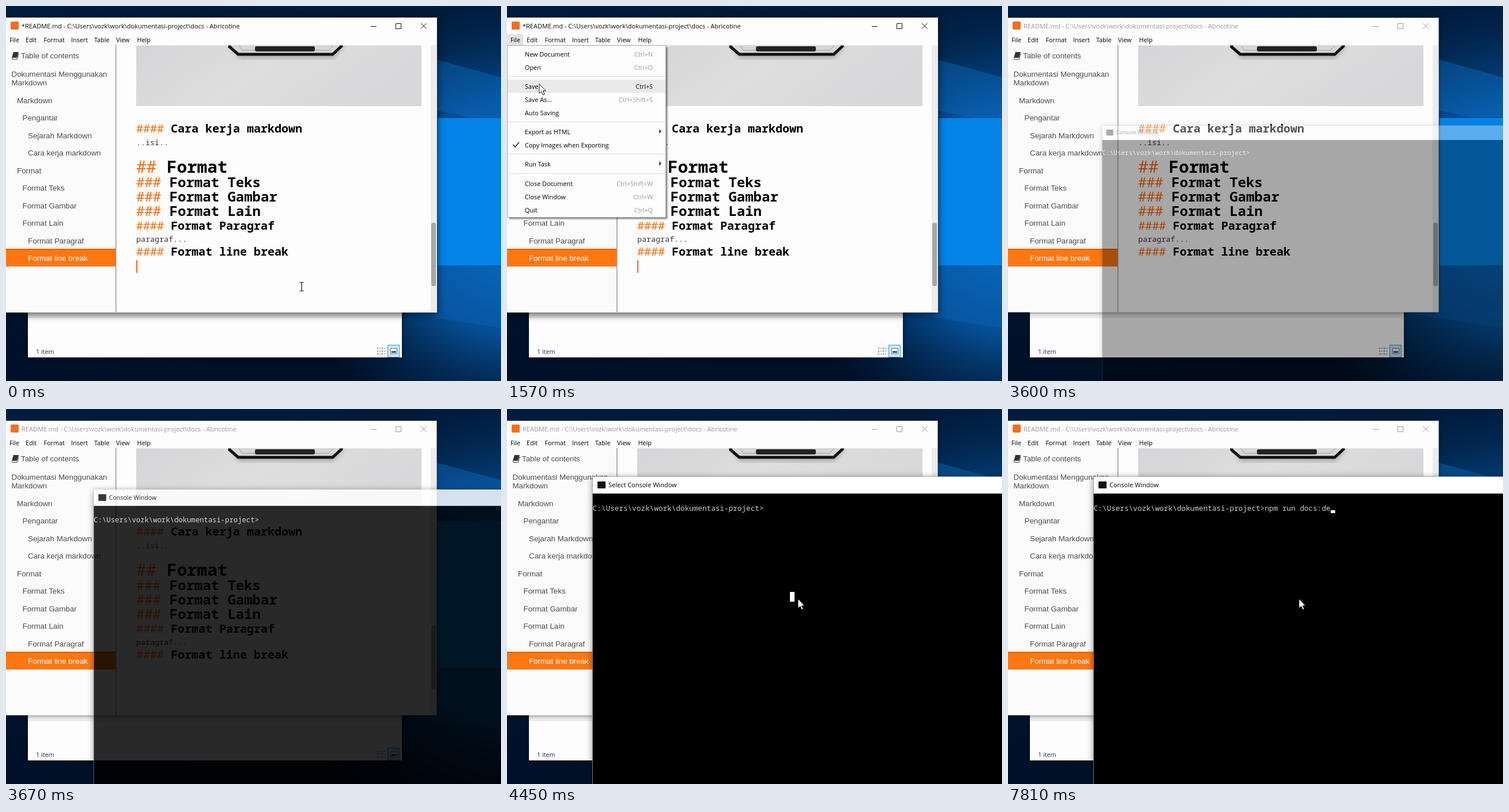
Animation, 859 px wide and 652 px high, one loop 8 s. Source, as an HTML page:

```html
<!DOCTYPE html>
<html lang="id">
<head>
<meta charset="utf-8">
<title>Docs editor</title>
<style>
html, body { margin: 0; width: 100%; height: 100%; overflow: hidden; background: #001a38; }
svg { display: block; }
text { white-space: pre; }
.ui { font: 11px "Open Sans", "Noto Sans", sans-serif; }
.menu { font-size: 10.8px; }
.side { font: 13.33px "Liberation Sans", Arial, sans-serif; fill: #4c4c4c; }
.mono { font-family: "Noto Sans Mono", "DejaVu Sans Mono", monospace; }
.hash { fill: #ff6a0d; font-weight: 400; }
#console { transform-origin: 257px 780px; }
</style>
</head>
<body>
<svg id="stage" width="859" height="652" viewBox="0 0 859 652"></svg>
<script>
const LOOP = 8000;
const PROMPT = 'C:\\Users\\vozk\\work\\dokumentasi-project>';
const COMMAND = 'npm run docs:de';
const COL = 7.62, COMMAND_X = 148.6 + PROMPT.length * COL;
const FILE_TITLE = 'README.md - C:\\Users\\vozk\\work\\dokumentasi-project\\docs - Abricotine';

const text = (x, y, s, cls = 'ui', attr = '') => `<text x="${x}" y="${y}" class="${cls}" ${attr}>${s}</text>`;
const rect = (x, y, w, h, fill, attr = '') => `<rect x="${x}" y="${y}" width="${w}" height="${h}" fill="${fill}" ${attr}/>`;
const path = (d, attr) => `<path d="${d}" ${attr}/>`;

// Table of contents: [indent level, label]
const toc = [
  [1, 'Markdown'], [2, 'Pengantar'], [3, 'Sejarah Markdown'], [3, 'Cara kerja markdown'],
  [1, 'Format'], [2, 'Format Teks'], [2, 'Format Gambar'], [2, 'Format Lain'],
  [3, 'Format Paragraf'], [3, 'Format line break']
];

// Headings: [level, baseline, size, label]
const headings = [
  [4, 220, 20, 'Cara kerja markdown'], [2, 290, 29.33, 'Format'],
  [3, 315, 24, 'Format Teks'], [3, 340, 24, 'Format Gambar'], [3, 364.5, 24, 'Format Lain'],
  [4, 388.5, 20, 'Format Paragraf'], [4, 434, 20, 'Format line break']
];

// File menu: [centre y, label, shortcut]
const fileMenu = [
  [84, 'New Document', 'Ctrl+N'], [107, 'Open', 'Ctrl+O'],
  [140, 'Save', 'Ctrl+S'], [163, 'Save As...', 'Ctrl+Shift+S'], [186, 'Auto Saving', ''],
  [219, 'Export as HTML', '▸'], [242, 'Copy Images when Exporting', ''], [275, 'Run Task', '▸'],
  [308.5, 'Close Document', 'Ctrl+Shift+W'], [331.5, 'Close Window', 'Ctrl+W'], [354.5, 'Quit', 'Ctrl+Q']
];

const defs = `<defs>
  <linearGradient id="sky" x2="0.3" y2="1">
    <stop stop-color="#001d40"/><stop offset="1" stop-color="#001026"/></linearGradient>
  <radialGradient id="glow" gradientUnits="userSpaceOnUse" cx="880" cy="370" r="400">
    <stop stop-color="#0a6cc4"/><stop offset=".5" stop-color="#0655a2" stop-opacity=".9"/>
    <stop offset="1" stop-color="#02305f" stop-opacity="0"/></radialGradient>
  <linearGradient id="wall" x2="1" y2="0.3">
    <stop stop-color="#d5d5d7"/><stop offset=".5" stop-color="#dededf"/><stop offset="1" stop-color="#d8d8da"/></linearGradient>
  <filter id="soft"><feGaussianBlur stdDeviation="4"/></filter>
  <filter id="tight"><feGaussianBlur stdDeviation="1.5"/></filter>
  <clipPath id="photo"><rect x="226" y="68.500" width="495" height="105.500"/></clipPath>
</defs>`;

const desktop = rect(0, 0, 859, 652, 'url(#sky)') + rect(0, 0, 859, 652, 'url(#glow)') +
  path('M700 80L859 124V205L740 180Z', 'fill="#0d6fc6" opacity=".4"') +
  path('M740 440L859 455V560L687 533Z', 'fill="#0d6fc6" opacity=".25"') +
  rect(749, 195, 256, 256, '#0583e6');

const folder = `<g style="filter:drop-shadow(0 1px 4px #0008)">${rect(38, 300, 649, 311, '#fdfdfd')}</g>` +
  rect(38, 533, 649, 10, '#ececec') + text(52, 604.5, '1 item', 'ui menu', 'fill="#1b2c66"') +
  [594, 599, 604].map(y => [644, 652].map(x =>
    rect(x, y, 2, 2, '#888') + rect(x + 3, y + 0.5, 4, 1, '#999')).join('')).join('') +
  rect(662.5, 589.5, 20, 21, '#c5e7fb', 'stroke="#3aa0d8"') +
  rect(667.5, 595.5, 11, 9, '#fff', 'stroke="#777"') + rect(669, 600, 8, 3, '#456');

const photo = `<g clip-path="url(#photo)">${rect(226, 68, 495, 106, 'url(#wall)')}` +
  path('M390 68L404 91H568L588 68Z', 'fill="#888" opacity=".6" filter="url(#soft)"') +
  path('M388 66V71L403 84H567L582 70V66', 'fill="#d6d6d8" stroke="#111" stroke-width="5"') +
  path('M404 68L410 77H560L568 68', 'fill="none" stroke="#999"') +
  rect(432, 70, 104, 9, '#222', 'rx="3"') + '</g>';

const sidebar = rect(0, 68, 190, 464, '#fbfbfb') + rect(190, 68, 1.5, 464, '#999') +
  path('M13 80H22L19 90H10Z', 'fill="#333"') + path('M10 90.500L11 92.500H19.500L22 83', 'fill="none" stroke="#333"') +
  text(26, 90.5, 'Table of contents', 'side') +
  text(9.5, 123, 'Dokumentasi Menggunakan', 'side') + text(9.5, 138, 'Markdown', 'side') +
  rect(0, 422, 190, 31, '#ff7711') + rect(0, 422, 190, 2, '#d9650d') +
  toc.map(([level, label], i) => text(9.5 + level * 9.5, 168.5 + i * 30.5, label, 'side',
    i == toc.length - 1 ? 'style="fill:#fff"' : '')).join('');

const editor = photo +
  headings.map(([n, y, size, label]) => text(226, y, `<tspan class="hash">${'#'.repeat(n)}</tspan> ${label}`,
    'mono', `font-size="${size}" font-weight="700"`)).join('') +
  [[241.5, '..isi..'], [410, 'paragraf...']].map(([y, s]) =>
    text(226, y, s, 'mono', 'font-size="13.33" fill="#333"')).join('') +
  rect(226, 442, 2, 22, '#f2622a', 'id="caret"') +
  rect(737, 68, 10, 464, '#ececec') + rect(738, 377, 8, 110, '#a8a8a8', 'rx="3"');

const appWindow = `<g id="frame">${rect(-19.5, 20.5, 767, 512, '#fdfdfd')}</g>` +
  rect(8, 27, 14, 14, '#f36f21', 'rx="2"') +
  `<g id="bar">${text(27, 38.5, '', 'ui', 'id="title"')}` +
  path('M633 35.500H643M676.500 30.500H685.500V39.500H676.500ZM720 30L729.500 39.500M729.500 30L720 39.500',
    'fill="none" stroke="currentColor"') + '</g>' +
  rect(0, 49, 28, 19, '#e3e3e3', 'id="hover"') +
  [[6, 'File'], [34, 'Edit'], [65.5, 'Format'], [113, 'Insert'], [153, 'Table'], [191, 'View'], [227.5, 'Help']]
    .map(([x, s]) => text(x, 62.5, s, 'ui menu')).join('') + sidebar + editor;

const menu = `<g id="menu">${rect(4, 72, 274, 298, '#0008', 'filter="url(#tight)"')}` +
  rect(0.5, 68.5, 275, 299, '#fdfdfd', 'stroke="#a5a5a5"') + rect(1, 0, 274, 23, '#e9e9e9', 'id="row"') +
  [122, 201, 257, 291].map(y => rect(1, y, 274, 1, '#dedede')).join('') +
  fileMenu.map(([y, label, key]) => text(31, y + 4, label, 'ui menu') + (key == '▸'
    ? path(`M264 ${y - 5}L268 ${y - 1}L264 ${y + 3}Z`, 'fill="#444"')
    : text(253, y + 4, key, 'ui menu key', 'text-anchor="end"'))).join('') +
  path('M10.500 241L14 245L21 237', 'fill="none" stroke="#222" stroke-width="1.500"') + '</g>';

const consoleWindow = `<g id="console"><g style="filter:drop-shadow(0 2px 6px #0007)">` +
  rect(148.5, 117.5, 930, 600, '#000') + '</g>' + rect(148.5, 117.5, 930, 29.5, '#fff') +
  rect(148, 147, 1, 570, '#777') + rect(157, 126, 14, 12, '#111') +
  text(176, 136, '', 'ui', 'id="consoleTitle"') +
  text(148.6, 177, '', 'mono', 'id="line" font-size="12.7" fill="#ccc"') +
  rect(0, 176, 7.6, 5, '#fff', 'id="block"') + rect(491, 318, 8, 17, '#fff', 'id="mark"') + '</g>';

const pointer = '<g id="pointer">' +
  path('M0 0V16.500L3.800 13L6.400 19L9 17.800L6.400 12H11.300Z', 'id="arrow" fill="#fff" stroke="#000" stroke-width=".9"') +
  path('M-3.500 -7.500H-1L0 -6.500L1 -7.500H3.500M0 -7V7M-3.500 7.500H-1L0 6.500L1 7.500H3.500',
    'id="beam" fill="none" stroke="#111" stroke-width="1.200"') + '</g>';

const $ = id => document.getElementById(id);
$('stage').innerHTML = defs + desktop + folder + appWindow + menu + consoleWindow + pointer;
const keys = [...document.querySelectorAll('.key')];
const keyed = fileMenu.filter(item => item[2] != '▸');

// Pointer stops: [time, x, y]
const stops = [
  [0, 513, 488], [40, 513, 488], [530, 22, 59], [680, 22, 59], [780, 12, 54], [960, 12, 54],
  [1540, 56, 135.5], [1980, 56, 135.5], [2670, 302, 670], [3800, 330, 670], [4300, 505, 330], [LOOP, 505, 330]
];

// Console input: [time, typed characters, block shown]
const typing = [
  [0, 0, 0], [3950, 0, 1], [4450, 0, 0], [4890, 0, 1], [5040, 1, 1], [5150, 2, 1], [5320, 3, 1], [5350, 4, 0],
  [5550, 4, 1], [5720, 5, 1], [5830, 6, 1], [6030, 7, 1], [6230, 8, 0], [6270, 8, 1], [6470, 9, 1], [6680, 10, 0],
  [6710, 10, 1], [6910, 11, 1], [7060, 12, 1], [7140, 12, 0], [7420, 13, 1], [7570, 14, 0], [7610, 14, 1], [7810, 15, 1]
];

const within = (t, a, b) => t >= a && t < b;
const show = (id, on) => $(id).setAttribute('visibility', on ? 'visible' : 'hidden');

function pointerAt(t) {
  const i = stops.findIndex(s => s[0] > t);
  const [t0, x0, y0] = stops[i - 1], [t1, x1, y1] = stops[i];
  const u = (t - t0) / (t1 - t0), e = u * u * (3 - 2 * u);
  return [x0 + (x1 - x0) * e, y0 + (y1 - y0) * e];
}

function drawEditor(t) {
  const active = t < 2840;
  $('title').textContent = (t < 1850 ? '*' : '') + FILE_TITLE;
  $('bar').style.color = $('title').style.fill = active ? '#111' : '#999';
  $('frame').style.stroke = active ? '#e4e8ec' : 'none';
  $('frame').style.filter = active ? 'drop-shadow(0 3px 7px #000a)' : 'drop-shadow(0 1px 3px #0007)';
  show('caret', t < 490 || within(t, 1030, 1750) || within(t, 2280, 2840));
  show('hover', within(t, 500, 1740));
}

function drawMenu(t, y) {
  const open = within(t, 920, 1740);
  const current = fileMenu.find(item => Math.abs(item[0] - y) < 11.5);
  $('menu').style.display = open ? '' : 'none';
  show('row', open && current);
  if (current) $('row').setAttribute('y', current[0] - 12);
  keys.forEach((key, i) => key.setAttribute('fill', keyed[i] == current ? '#111' : '#999'));
}

function drawConsole(t) {
  const dt = t - 3600, rest = Math.max(0, 1 - dt / 190);
  const [, count, lit] = typing.findLast(s => s[0] <= t);
  const selecting = within(t, 4340, 5040);
  $('console').style.display = dt < 0 ? 'none' : '';
  $('console').style.opacity = Math.min(1, 0.33 + dt / 140);
  $('console').style.transform = `scale(${1 - 0.138 * rest ** 3})`;
  $('consoleTitle').textContent = (selecting ? 'Select ' : '') + 'Console Window';
  $('line').textContent = PROMPT + COMMAND.slice(0, count);
  $('block').setAttribute('x', COMMAND_X + count * COL);
  show('block', lit);
  show('mark', selecting);
}

function frame(now) {
  const t = now % LOOP, [x, y] = pointerAt(t);
  const overText = t < 3600 && x > 191 && within(y, 68, 532);
  $('pointer').setAttribute('transform', `translate(${x} ${y})`);
  show('arrow', !overText);
  show('beam', overText);
  drawEditor(t);
  drawMenu(t, y);
  drawConsole(t);
  requestAnimationFrame(frame);
}
frame(performance.now());
</script>
</body>
</html>
```
